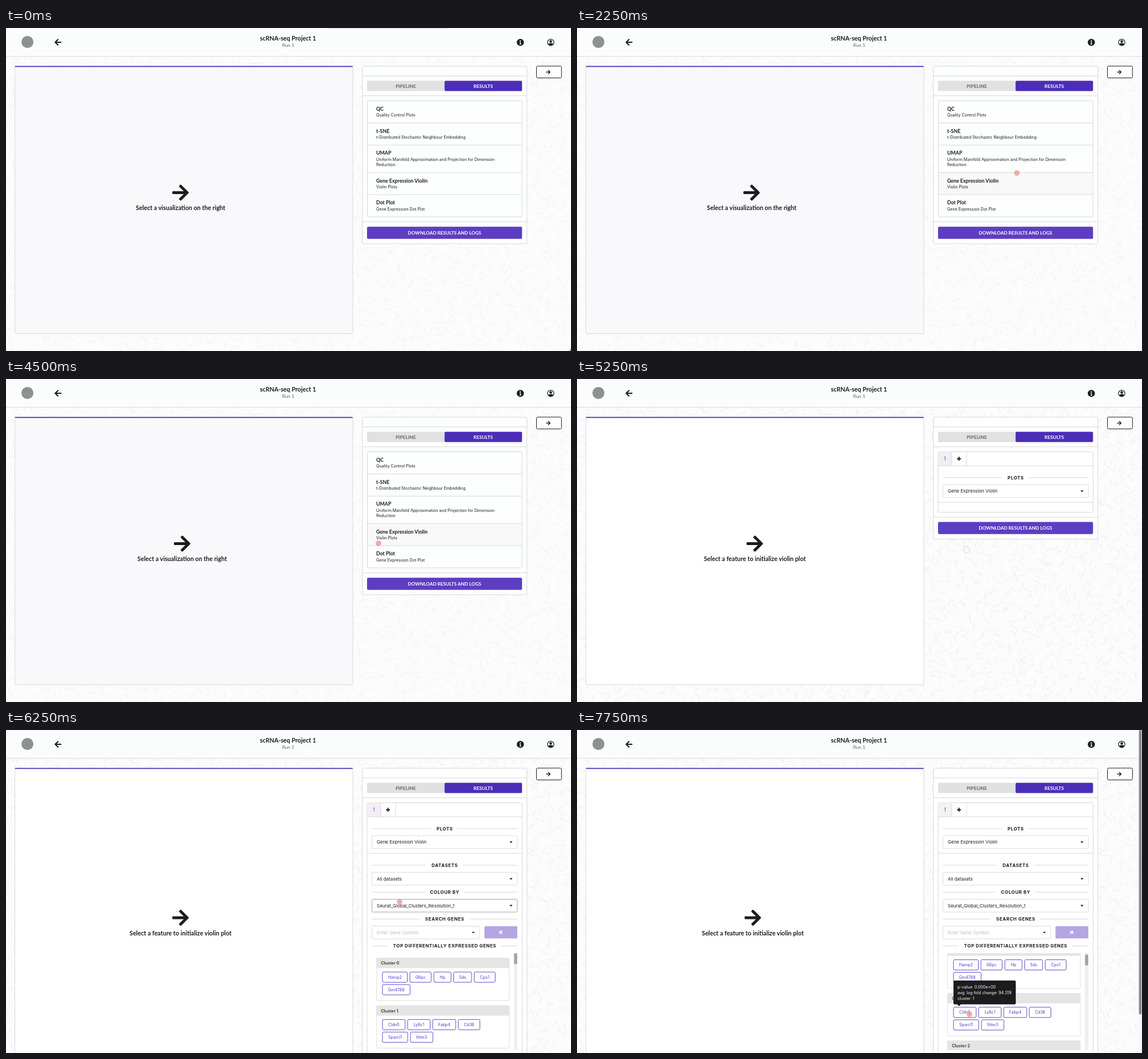
Write an HTML page that moves like this. It is 989x566 px and loops after 8000 ms.

```html
<!DOCTYPE html>
<html lang="en">
<head>
<meta charset="utf-8">
<title>scRNA-seq results</title>
<style>
html, body { margin: 0; width: 100%; height: 100%; overflow: hidden; background: #fbfcfb; }
svg { display: block; }
text { fill: #1b1c1d; }
.lato { font-family: Lato, sans-serif; }
.inter { font-family: Inter, sans-serif; }
.bold { font-weight: 700; }
</style>
</head>
<body>
<svg id="stage" width="989" height="566" viewBox="0 0 989 566"></svg>
<script>
const LOOP = 8000, STEP = 250;
const PLOT_AT = 5250, FORM_AT = 5500, TIP_AT = 7500;
const INK = '#1b1c1d', LINE = '#d7d8da', PURPLE = '#4c2db8', VIOLET = '#5d3dc2';
const ARROW = 'M190.5 66.9l22.2-22.2c9.4-9.4 24.6-9.4 33.9 0L441 239c9.4 9.4 9.4 24.6 0 33.9L246.6 467.3c-9.4 9.4-24.6 9.4-33.9 0l-22.2-22.2c-9.5-9.5-9.3-25 .4-34.3L311.4 296H24c-13.3 0-24-10.7-24-24v-32c0-13.3 10.7-24 24-24h287.4L190.9 101.2c-9.8-9.3-10-24.8-.4-34.3z';

const rect = (x, y, x2, y2, fill, stroke = 'none', r = 0, more = '') =>
  `<rect x="${x}" y="${y}" width="${x2 - x}" height="${y2 - y}" rx="${r}" fill="${fill}" stroke="${stroke}" ${more}/>`;
const path = (d, stroke = LINE, w = 1, more = '') =>
  `<path d="${d}" fill="none" stroke="${stroke}" stroke-width="${w}" ${more}/>`;
const hline = (x, y, x2) => path(`M${x} ${y}H${x2}`);
const text = (s, x, y, size, cls = 'inter', more = '') =>
  `<text x="${x}" y="${y}" font-size="${size}" class="${cls}" ${more}>${s}</text>`;
const mid = (s, x, y, size, cls, more = '') => text(s, x, y, size, cls, `text-anchor="middle" ${more}`);
const group = (id, body, more = '') => `<g id="${id}" ${more}>${body}</g>`;
const arrow = (cx, cy, w, dir = 1) =>
  `<path d="${ARROW}" fill="${INK}" transform="translate(${cx} ${cy}) scale(${dir * w / 448} ${w / 448}) translate(-224 -256)"/>`;

// seeded zigzag wallpaper
function wallpaper() {
  let seed = 7, d = '';
  const rnd = () => (seed = (seed * 16807) % 2147483647) / 2147483647;
  for (let y = 52; y < 570; y += 13) {
    for (let x = 0; x < 995; x += 15) {
      let a = rnd() * 6.283, px = x + rnd() * 11, py = y + rnd() * 10;
      d += `M${px.toFixed(1)} ${py.toFixed(1)}`;
      for (let k = 0; k < 3; k++) {
        const b = a + (k % 2 ? 0.6 : -0.6), len = 4 + rnd() * 2;
        d += `l${(Math.cos(b) * len).toFixed(1)} ${(Math.sin(b) * len).toFixed(1)}`;
      }
    }
  }
  return path(d, '#edefee', 0.9, 'id="paper"');
}

function header() {
  return rect(0, 0, 989, 49.5, '#fbfcfc') + hline(0, 49.7, 989) +
    `<circle cx="37.5" cy="24.5" r="10.5" fill="#8f9190"/>` +
    arrow(91, 25, 12, -1) +
    mid('scRNA-seq Project 1', 493.7, 22.3, 10.7, 'lato bold') +
    mid('Run 1', 494, 33, 8.3, 'lato', 'style="fill:#666"') +
    `<circle cx="900.3" cy="25.2" r="6.2" fill="${INK}"/>` +
    `<circle cx="900.3" cy="22.3" r="1.1" fill="#fff"/>` +
    path('M898.9 24.6h1.7v3.6M898.7 28.4h3.2', '#fff', 1.1) +
    `<circle cx="953.5" cy="25.2" r="5.6" fill="none" stroke="${INK}" stroke-width="1.2"/>` +
    `<circle cx="953.5" cy="23.5" r="2.3" fill="${INK}"/>` +
    `<path d="M949.2 28.6q1-2 2.6-2h3.4q1.600 0 2.600 2q-1.500 2.200-4.300 2.200t-4.300-2.200z" fill="${INK}"/>`;
}

function item(title, lines, y) {
  return text(title, 648, y, 8.8, 'lato bold') +
    lines.map((s, i) => text(s, 648, y + 10.2 + i * 9.7, 7.1)).join('');
}

function resultList() {
  return rect(632.5, 127.5, 903.2, 331, '#fdfefe', LINE, 2) +
    rect(633, 0, 902.7, 39, '#f8f8f9', 'none', 0, 'id="hover"') +
    [166.3, 205.2, 253.3, 292].map(y => hline(632.5, y, 903)).join('') +
    item('QC', ['Quality Control Plots'], 145) +
    item('t-SNE', ['t-Distributed Stochastic Neighbour Embedding'], 183.7) +
    item('UMAP', ['Uniform Manifold Approximation and Projection for Dimension', 'Reduction'], 222.4) +
    item('Gene Expression Violin', ['Violin Plots'], 270.6) +
    item('Dot Plot', ['Gene Expression Dot Plot'], 309.4);
}

function divider(s, y, x1, x2) {
  return hline(640.5, y, x1) + hline(x2, y, 895) +
    mid(s, 768, y + 2.9, 7.9, 'inter bold', 'letter-spacing=".6"');
}

const caret = (x, y) => `<path d="M${x - 2.6} ${y - 1.2}h5.2l-2.600 2.900z" fill="${INK}"/>`;

function select(s, y, x2 = 895, more = '', ink = INK) {
  return rect(640.5, y, x2, y + 22.5, '#fff', '#d9dadc', 2, more) +
    text(s, 649, y + 14.1, 8, 'inter', `style="fill:${ink}"`) + caret(x2 - 11, y + 11.3);
}

function plotBox() {
  return rect(632, 127.5, 656, 152, '#f3edf6', 'none', 0, 'id="tab"') +
    path('M632 152H903.5M656 127.500V152M682 127.500V152M632 216H903.500') +
    mid('1', 644, 142.7, 8.3, 'inter', `style="fill:${VIOLET}"`) +
    path('M665.2 139.700h7M668.700 136.200v7', INK, 2) +
    divider('PLOTS', 172.8, 744, 790) +
    select('Gene Expression Violin', 185.2);
}

const pill = (s, x, x2, y) => rect(x, y, x2, y + 18, '#fff', '#604bcb', 2) +
  mid(s, (x + x2) / 2, y + 11.6, 7.1, 'inter', 'style="fill:#4f3bc4"');

function card(n, y, rows) {
  const body = rows.map((row, i) => row.map(p => pill(...p, y + 24.3 + i * 22)).join('')).join('');
  return rect(648.7, y, 881, y + 74.5, '#fff', '#dededf', 2) +
    rect(648.7, y, 881, y + 17.5, '#e5e5e6', 'none', 1) +
    text('Cluster ' + n, 656.3, y + 11.6, 7.2, 'inter bold', 'style="fill:#444"') + body;
}

function form() {
  return divider('DATASETS', 237, 735, 800) + select('All datasets', 249.4) +
    divider('COLOUR BY', 284.2, 733, 802) +
    select('Seurat_Global_Clusters_Resolution_1', 296.5, 895, 'id="colour"') +
    divider('SEARCH GENES', 331.4, 724, 811) +
    select('Enter Gene Symbol', 343.6, 829, '', '#bfbfc1') +
    rect(837.5, 343.8, 895, 365.3, '#b4a6e1', 'none', 2) +
    path('M863.6 352l5 5m0-5l-5 5', '#fff', 1.8) +
    divider('TOP DIFFERENTIALLY EXPRESSED GENES', 378.5, 668, 867) +
    `<g clip-path="url(#listClip)">` + group('cards',
      card(0, 399.8, [
        [['Hamp2', 659, 702.5], ['G6pc', 707, 744.2], ['Hp', 749, 779], ['Sds', 783.6, 815], ['Cps1', 819.6, 856.3]],
        [['Gm4788', 659, 707.3]]]) +
      card(1, 483, [
        [['Cldn5', 659, 698.7], ['Ly6c1', 703, 742.5], ['Fabp4', 747, 787.2], ['Cd36', 791.6, 829.5]],
        [['Sparcl1', 659, 703.2], ['Ifitm3', 708, 747.2]]]) +
      card(2, 566.2, [])) + '</g>' +
    rect(889, 391, 895, 561, '#efeff0') +
    rect(889.3, 391, 894.8, 410.5, '#a3a3a5', 'none', 2.5, 'id="thumb"');
}

function tooltip() {
  return rect(659, 439, 768, 480.7, INK, 'none', 2) +
    `<path d="M665 480h7.500l-3.700 4z" fill="${INK}"/>` +
    ['p-value: 0.000e+00', 'avg. log fold change: 94.319', 'cluster: 1']
      .map((s, i) => text(s, 666, 452.6 + i * 10, 7.1, 'inter', 'style="fill:#fff"')).join('');
}

const stage = document.getElementById('stage');
stage.innerHTML =
  '<clipPath id="listClip"><rect x="640" y="391" width="249" height="170"/></clipPath>' +
  rect(0, 0, 989, 566, '#fbfcfb') + wallpaper() + header() +
  rect(560, -8, 775, 1, '#dcd9dc', 'none', 3, 'id="notice" opacity=".8"') +
  rect(15.5, 67.5, 607, 535.5, '#f9f9fb', LINE, 2, 'id="plot"') +
  rect(15.5, 66.5, 607, 68.3, PURPLE, 'none', 1) +
  group('prompt', arrow(0, 0, 28.8) + mid('', 0, 30.7, 10.7, 'lato bold', 'id="label"')) +
  rect(623.8, 67, 911.8, 378, '#fdfefe', LINE, 2, 'id="side"') +
  path('M624 84H911.800M624 118.800H911.800') +
  rect(632, 92.5, 768, 110.5, '#e0e1e2', 'none', 2) + rect(767.7, 92.5, 903.3, 110.5, PURPLE, 'none', 2) +
  mid('PIPELINE', 699.7, 104.5, 8.3, 'lato bold', 'style="fill:#636465"') +
  mid('RESULTS', 835.3, 104.5, 8.3, 'lato bold', 'style="fill:#fff"') +
  group('list', resultList()) +
  rect(632, 127.5, 903.5, 233.5, '#fff', LINE, 2, 'id="box"') +
  group('plots', plotBox()) + group('form', form()) +
  group('download', hline(624, -8.5, 911.8) + rect(632, 0, 903.3, 21.3, VIOLET, 'none', 2) +
    mid('DOWNLOAD RESULTS AND LOGS', 767.6, 13.5, 8.2, 'lato bold', 'style="fill:#fff"')) +
  rect(928.5, 66.8, 972.3, 87.5, '#fff', INK, 2) + arrow(949.3, 77.2, 7.8) +
  group('tip', tooltip()) +
  group('bar', rect(983, 0, 989, 566, '#f7f7f8') + rect(983.6, 0, 988.2, 498.5, '#89898b', 'none', 2.3)) +
  '<circle id="cursor"/>';

const el = {};
stage.querySelectorAll('[id]').forEach(n => el[n.id] = n);
const set = (id, attrs) => { for (const k in attrs) el[id].setAttribute(k, attrs[k]); };
const show = (id, on) => { el[id].style.display = on ? '' : 'none'; };

// CSS "ease" curve, solved by bisection
function ease(x) {
  let lo = 0, hi = 1;
  const bez = (a, b, u) => 3 * (1 - u) ** 2 * u * a + 3 * (1 - u) * u * u * b + u ** 3;
  for (let i = 0; i < 20; i++) {
    const m = (lo + hi) / 2;
    if (bez(0.25, 0.25, m) < x) lo = m; else hi = m;
  }
  return bez(0.1, 1, lo);
}

// ten-part sideways shake over two seconds
function shake(t) {
  const start = t < 250 ? -1000 : t < PLOT_AT ? 442 : PLOT_AT;
  const p = ((t - start + 4000) % 2000) / 200, k = Math.floor(p);
  const key = i => i % 10 === 0 ? 0 : i % 2 ? -1 : 1;
  return 5.7 * (key(k) + (key(k + 1) - key(k)) * ease(p - k));
}

const TRACK = [
  [0, 990, 567], [250, 984, 530], [750, 968, 360], [1250, 957, 252], [1500, 950, 249],
  [2000, 850, 246], [2500, 690, 262], [3250, 647, 266], [3750, 647, 272], [4500, 652, 288],
  [5000, 668, 287], [5250, 682, 299], [5750, 688, 302], [6250, 689, 301], [6750, 690, 380],
  [7250, 685, 480], [7500, 684, 496], [7750, 687, 498], [8000, 687, 498]
];
function cursorAt(t) {
  const i = Math.max(1, TRACK.findIndex(k => k[0] >= t));
  const [t0, x0, y0] = TRACK[i - 1], [t1, x1, y1] = TRACK[i];
  const u = (t - t0) / (t1 - t0);
  return [x0 + (x1 - x0) * u, y0 + (y1 - y0) * u];
}

function draw(time) {
  const t = Math.floor((time % LOOP) / STEP) * STEP;
  const plot = t >= PLOT_AT, full = t >= FORM_AT;
  const [x, y] = cursorAt(t);

  show('notice', t < 500);
  show('list', !plot);
  show('box', plot);
  show('plots', plot);
  show('form', full);
  show('download', !full);
  show('tip', t >= TIP_AT);
  show('bar', t >= 6750);

  set('paper', { stroke: plot && !full ? '#eeebee' : full ? '#eceded' : '#f0f2f1' });
  set('plot', { height: full ? 550 : 468, fill: plot ? '#fff' : '#f9f9fb' });
  set('side', { height: full ? 550 : plot ? 213.5 : 311, fill: plot ? '#fff' : '#fdfefe' });
  set('box', { height: full ? 500 : 106 });
  set('download', { transform: `translate(0 ${plot ? 250.5 : 348.2})` });

  set('prompt', { transform: `translate(${311.2 + shake(t)} ${full ? 329 : 288.5})` });
  el.label.textContent = plot ? 'Select a feature to initialize violin plot' : 'Select a visualization on the right';

  const overItem = !plot && x < 903 && y > 205 && y < 292;
  show('hover', overItem);
  set('hover', y < 253.3 ? { y: 205.2, height: 48 } : { y: 253.3, height: 38.7 });
  set('tab', { fill: t >= 6750 ? '#f3f2f5' : '#f3edf6' });
  set('colour', { stroke: full && y > 296 && y < 319 ? '#a5a6a8' : '#d9dadc' });

  const s = Math.min(1, Math.max(0, (t - 6500) / 750)), roll = s * s * (3 - 2 * s);
  set('cards', { transform: `translate(0 ${-21.5 * roll})` });
  set('thumb', { y: 391 + 2.3 * roll });

  const first = t >= 1000 && t < 1500, ring = first || (t >= 5000 && t < 5500);
  set('cursor', {
    cx: x, cy: y, r: ring ? 5.7 : 4.8,
    fill: ring ? 'none' : '#f08c8c', 'fill-opacity': 0.75,
    stroke: ring ? (first ? '#e4e0e1' : '#f6c3c8') : 'none', 'stroke-width': 1
  });
}

const begin = performance.now();
function frame() {
  draw(performance.now() - begin);
  requestAnimationFrame(frame);
}
draw(0);
requestAnimationFrame(frame);
</script>
</body>
</html>
```
